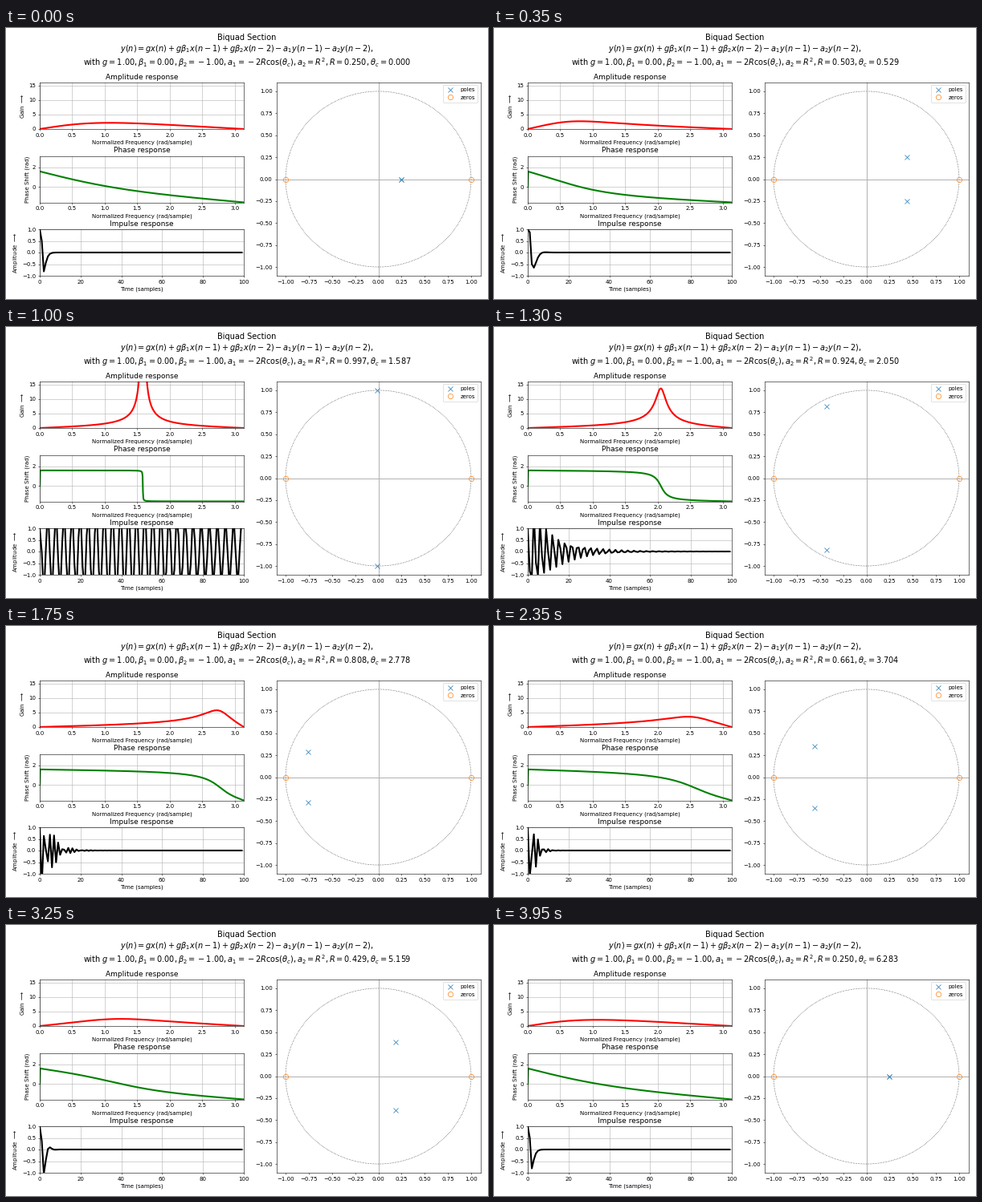
A matplotlib script for the animation above (4000 ms loop, 600 by 338 pixels).

```python
import numpy as np
import matplotlib.pyplot as plt
from matplotlib.animation import FuncAnimation
from matplotlib.patches import Circle

W, H, DPI = 600, 338, 50
FRAMES, STEPS = 80, 96
SAMPLES = 100
G, BETA1, BETA2 = 1.0, 0.0, -1.0

omega = np.linspace(0, np.pi, 512, endpoint=False)
thetas = np.linspace(0, 2 * np.pi, STEPS)
radii = np.interp(thetas, [0, np.pi / 2, 2 * np.pi], [0.25, 1, 0.25])

HEAD = ("Biquad Section\n"
        r"$y(n)=gx(n)+g\beta_1x(n-1)+g\beta_2x(n-2)-a_1y(n-1)-a_2y(n-2)$,"
        "\n")
PARAMS = (r"with $g=%.2f,\beta_1=%.2f,\beta_2=%.2f,"
          r"a_1=-2R\cos(\theta_c),a_2=R^2,R=%.3f,\theta_c=%.3f$")

fig = plt.figure(figsize=(W / DPI, H / DPI), dpi=DPI, facecolor="white")


def add_axes(x0, top, x1, bottom):
    return fig.add_axes([x0 / W, 1 - bottom / H, (x1 - x0) / W, (bottom - top) / H])


def response_axes(top, title, xlabel, ylabel, xlim, ylim, xticks, yticks):
    ax = add_axes(42, top, 296, top + 58)
    ax.set_title(title, fontsize=13)
    ax.set(xlabel=xlabel, ylabel=ylabel, xlim=xlim, ylim=ylim,
           xticks=xticks, yticks=yticks)
    ax.grid(True)
    return ax


def curve(ax, color):
    return ax.plot([], [], color=color, lw=3)[0]


freq = dict(xlabel="Normalized Frequency (rad/sample)", xlim=(0, np.pi),
            xticks=np.arange(0, 3.1, 0.5))
amp_ax = response_axes(68, "Amplitude response", ylabel=r"Gain $\longrightarrow$",
                       ylim=(0, 16), yticks=[0, 5, 10, 15], **freq)
phase_ax = response_axes(159.5, "Phase response", ylabel="Phase Shift (rad)",
                         ylim=(-np.pi / 2, np.pi), yticks=[0, 2], **freq)
imp_ax = response_axes(251, "Impulse response", "Time (samples)",
                       r"Amplitude $\longrightarrow$", (0, 100), (-1, 1),
                       np.arange(0, 101, 20), np.arange(-1, 1.1, 0.5))
amp_line = curve(amp_ax, "red")
phase_line = curve(phase_ax, "green")
imp_line = curve(imp_ax, "black")

plane = add_axes(336.5, 68, 590.5, 309)
ticks = np.arange(-1, 1.1, 0.25)
plane.set(xlim=(-1.1, 1.1), ylim=(-1.1, 1.1), xticks=ticks, yticks=ticks)
plane.axvline(0, color="0.7")
plane.axhline(0, color="0.7")
plane.add_patch(Circle((0, 0), 1, fill=False, color="black", ls=":", lw=0.8))
poles, = plane.plot([], [], "x", ms=9, color="C0", label="poles")
plane.plot([-1, 1], [0, 0], "o", ms=9, mfc="none", color="C1", label="zeros")
plane.legend(loc="upper right")

heading = fig.suptitle("", fontsize=14)


def impulse_response(a1, a2):
    x = np.zeros(SAMPLES)
    x[:3] = G, G * BETA1, G * BETA2
    y = np.zeros(SAMPLES)
    for n in range(SAMPLES):
        y[n] = x[n]
        if n > 0:
            y[n] -= a1 * y[n - 1]
        if n > 1:
            y[n] -= a2 * y[n - 2]
    return y


def update(i):
    k = round(i * STEPS / FRAMES)
    r, theta = radii[k], thetas[k]
    a1, a2 = -2 * r * np.cos(theta), r * r
    z = np.exp(-1j * omega)
    h = G * (1 + BETA1 * z + BETA2 * z**2) / (1 + a1 * z + a2 * z**2)
    phase = np.angle(h)
    if k == 0:
        phase[0] = np.nan

    heading.set_text(HEAD + PARAMS % (G, BETA1, BETA2, r, theta))
    amp_line.set_data(omega, abs(h))
    phase_line.set_data(omega, phase)
    imp_line.set_data(np.arange(SAMPLES), impulse_response(a1, a2))
    pole = r * np.exp(1j * theta)
    poles.set_data([pole.real, pole.real], [pole.imag, -pole.imag])
    return amp_line, phase_line, imp_line, poles, heading


anim = FuncAnimation(fig, update, frames=FRAMES, interval=50, repeat=True,
                     repeat_delay=0, blit=False)
plt.show()
```
